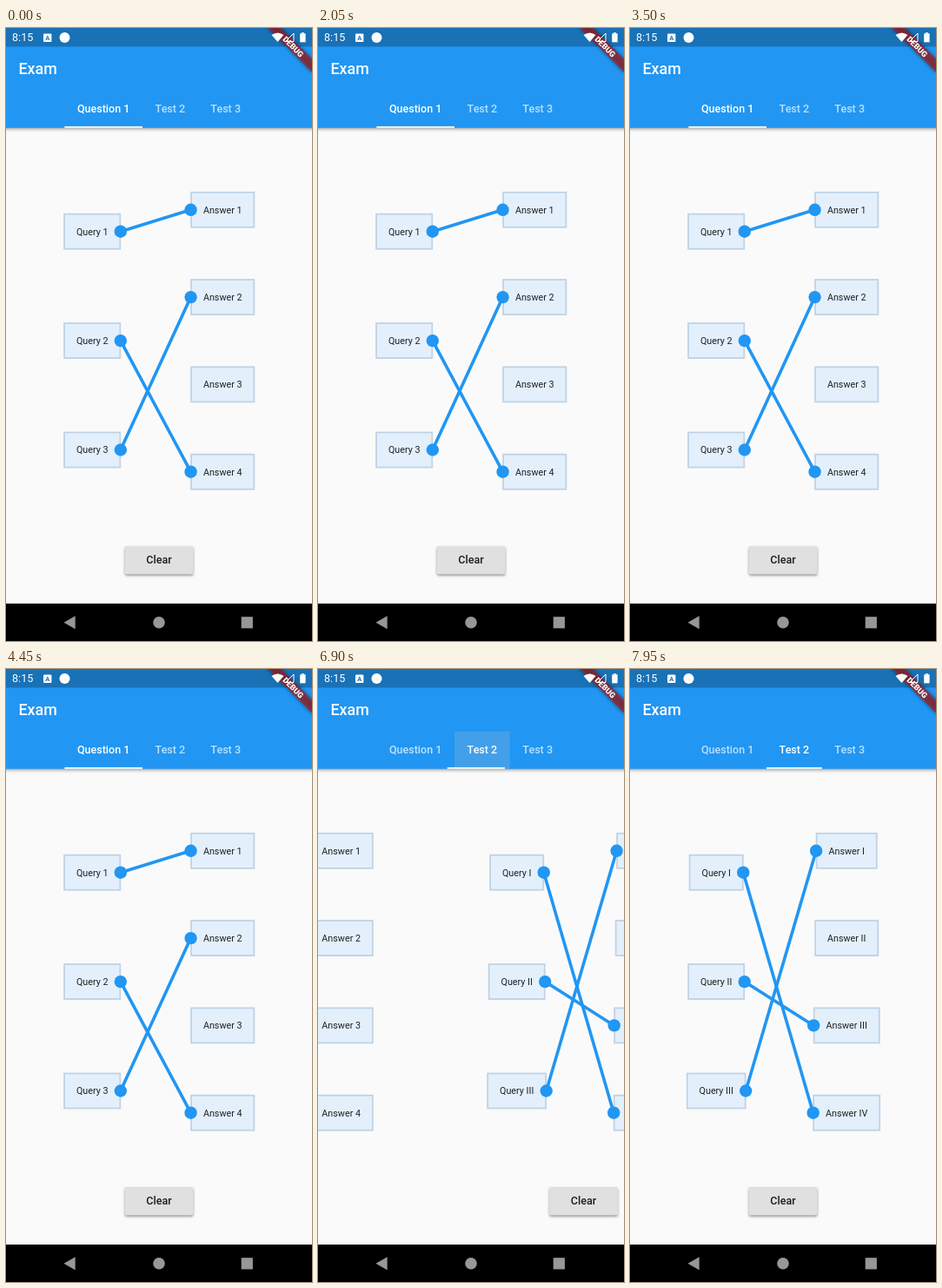
An HTML page with a canvas that plays this animation: 352x704 px, repeating every 8 s.

```html
<!DOCTYPE html>
<html lang="en">
<head>
<meta charset="utf-8">
<title>Exam</title>
<style>
html, body { margin: 0; width: 100%; height: 100%; overflow: hidden; background: #fafafa; }
canvas { display: block; width: 352px; height: 704px; }
</style>
</head>
<body>
<canvas id="stage" width="352" height="704"></canvas>
<script>
const ctx = document.getElementById('stage').getContext('2d');
const W = 352, LOOP = 8000, DP = 0.896;
const BLUE = '#2196f3', INK = 'rgba(0,0,0,.87)';
const QUERY_X = 99.2, ANSWER_X = 249.2, BOX_H = 41;

const pages = [
  { queries: ['1', '2', '3'], answers: ['1', '2', '3', '4'], links: [[0, 0], [1, 3], [2, 1]] },
  { queries: ['I', 'II', 'III'], answers: ['I', 'II', 'III', 'IV'], links: [[0, 3], [1, 2], [2, 0]] }
];
const tabs = [
  { label: 'Question 1', x: 67.3, w: 89.7 },
  { label: 'Test 2', x: 157, w: 63.8 },
  { label: 'Test 3', x: 220.8, w: 63.8 }
];
// finger paths: time, x, y
const drags = [
  [[2500, 131.6, 235], [2550, 131.4, 247], [2800, 133, 325], [2950, 134, 352], [3100, 134, 357]],
  [[5050, 133, 235], [5250, 160, 251], [5550, 222, 294], [5800, 234, 302], [5950, 235, 303]]
];

const clamp = v => Math.max(0, Math.min(1, v));
const lerp = (a, b, k) => a + (b - a) * k;
const ramp = (t, from, to) => clamp((t - from) / (to - from));

// cubic-bezier(.25, .1, .25, 1)
function ease(x) {
  let lo = 0, hi = 1, s = x;
  for (let i = 0; i < 24; i++) {
    s = (lo + hi) / 2;
    if (0.75 * s * (1 - s) + s * s * s < x) lo = s; else hi = s;
  }
  return 0.3 * s * (1 - s) ** 2 + 3 * s * s * (1 - s) + s ** 3;
}

function rect(x, y, w, h, color) {
  ctx.fillStyle = color;
  ctx.fillRect(x, y, w, h);
}

function disc(x, y, r, color) {
  ctx.fillStyle = color;
  ctx.beginPath();
  ctx.arc(x, y, r, 0, Math.PI * 2);
  ctx.fill();
}

function poly(points, color) {
  ctx.fillStyle = color;
  ctx.beginPath();
  points.forEach(p => ctx.lineTo(p[0], p[1]));
  ctx.fill();
}

function setFont(size, weight) {
  ctx.font = `${weight} ${size}px Roboto, sans-serif`;
}

function text(str, x, y, size, weight, color, align = 'center') {
  setFont(size, weight);
  ctx.textAlign = align;
  ctx.textBaseline = 'alphabetic';
  ctx.fillStyle = color;
  ctx.fillText(str, x, y + size * 0.355);
}

function shadow(color, blur, dy) {
  ctx.shadowColor = color;
  ctx.shadowBlur = blur;
  ctx.shadowOffsetY = dy;
}

function link(a, b) {
  ctx.strokeStyle = BLUE;
  ctx.lineWidth = 3.6;
  ctx.beginPath();
  ctx.moveTo(a.x, a.y);
  ctx.lineTo(b.x, b.y);
  ctx.stroke();
}

const queryY = i => 233.7 + 125.4 * i;
const answerY = i => 208.8 + 100.3 * i;

function box(label, cx, cy) {
  setFont(12 * DP, 400);
  const w = ctx.measureText(label).width + 32 * DP;
  const x = cx - w / 2, y = cy - BOX_H / 2;
  rect(x, y, w, BOX_H, '#e3f0fc');
  ctx.strokeStyle = '#bfd3e6';
  ctx.lineWidth = 1.8;
  ctx.strokeRect(x + 0.5, y + 0.5, w - 1, BOX_H - 1);
  text(label, cx, cy, 12 * DP, 400, INK);
  return w / 2;
}

function clearButton() {
  ctx.save();
  shadow('rgba(0,0,0,.38)', 3, 1.6);
  ctx.fillStyle = '#e0e0e0';
  ctx.beginPath();
  ctx.roundRect(136.7, 595, 78.8, 32.3, 1.8);
  ctx.fill();
  ctx.restore();
  text('Clear', 176, 611, 14 * DP, 500, INK);
}

function fingerAt(path, t) {
  for (let i = 1; i < path.length; i++) {
    const a = path[i - 1], b = path[i];
    if (t >= a[0] && t < b[0]) {
      const k = ramp(t, a[0], b[0]);
      return { x: lerp(a[1], b[1], k), y: lerp(a[2], b[2], k) };
    }
  }
  return null;
}

function drawPage(page, offset, t) {
  ctx.save();
  ctx.translate(offset, 0);
  const from = page.queries.map((n, i) =>
    ({ x: QUERY_X + box('Query ' + n, QUERY_X, queryY(i)), y: queryY(i) }));
  const to = page.answers.map((n, i) =>
    ({ x: ANSWER_X - box('Answer ' + n, ANSWER_X, answerY(i)), y: answerY(i) }));
  clearButton();

  if (page === pages[0]) {
    for (const path of drags) {
      const tip = fingerAt(path, t);
      if (!tip) continue;
      ctx.globalAlpha = 0.28;
      link(from[0], tip);
      disc(tip.x, tip.y, 7.2, BLUE);
      ctx.globalAlpha = 1;
    }
  }
  for (const [q, a] of page.links) {
    link(from[q], to[a]);
    disc(from[q].x, from[q].y, 7.2, BLUE);
    disc(to[a].x, to[a].y, 7.2, BLUE);
  }
  ctx.restore();
}

function tapGlow(t) {
  const tab = tabs[1];
  const level = ramp(t, 6600, 6740) * (1 - ramp(t, 6820, 7080));
  if (level <= 0) return;
  ctx.save();
  ctx.beginPath();
  ctx.rect(tab.x, 71.7, tab.w, 43);
  ctx.clip();
  rect(tab.x, 71.7, tab.w, 43, `rgba(188,188,188,${0.2 * level})`);
  disc(tab.x + tab.w / 2, 93, lerp(8, 42, ramp(t, 6600, 6850)), `rgba(200,200,200,${0.13 * level})`);
  ctx.restore();
}

function appBar(t) {
  ctx.save();
  shadow('rgba(0,0,0,.4)', 4, 1.6);
  rect(-10, 0, W + 20, 114.7, BLUE);
  ctx.restore();
  rect(0, 0, W, 21.4, '#1971b6');
  text('Exam', 14.4, 47, 20 * DP, 500, '#fff', 'left');

  tapGlow(t);
  const k = ease(ramp(t, 6710, 7010));
  const lit = [1 - k, k, 0];
  tabs.forEach((tab, i) =>
    text(tab.label, tab.x + tab.w / 2, 92.5, 14 * DP, 500, `rgba(255,255,255,${0.7 + 0.3 * lit[i]})`));
  rect(lerp(tabs[0].x, tabs[1].x, k), 112.9, lerp(tabs[0].w, tabs[1].w, k), 1.8, '#fff');
}

function banner() {
  ctx.save();
  ctx.translate(W, 0);
  ctx.rotate(Math.PI / 4);
  const bar = [-40 * DP, 28 * DP, 80 * DP, 12 * DP];
  ctx.filter = 'blur(2px)';
  rect(...bar, 'rgba(0,0,0,.5)');
  ctx.filter = 'none';
  rect(...bar, 'rgba(183,28,28,.627)');
  text('DEBUG', 0, 34 * DP, 10.2 * DP, 900, '#fff');
  ctx.restore();
}

function statusIcons() {
  text('8:15', 7, 11, 12.6, 400, '#fff', 'left');
  ctx.fillStyle = '#fff';
  ctx.beginPath();
  ctx.roundRect(43, 6.5, 9.4, 9.4, 1);
  ctx.fill();
  text('A', 47.7, 11.2, 7.5, 700, '#1971b6');
  disc(67.5, 11, 6, '#fff');

  ctx.fillStyle = '#fff';
  ctx.beginPath();
  ctx.moveTo(312.5, 16);
  ctx.lineTo(305.5, 8);
  ctx.quadraticCurveTo(312.5, 3, 319.5, 8);
  ctx.fill();

  ctx.strokeStyle = '#fff';
  ctx.lineWidth = 1;
  ctx.beginPath();
  ctx.moveTo(321.5, 15.5);
  ctx.lineTo(331, 15.5);
  ctx.lineTo(331, 6);
  ctx.closePath();
  ctx.stroke();

  rect(338.2, 6.3, 6.4, 10, '#fff');
  rect(339.9, 5.2, 3, 1.2, '#fff');
}

function navBar() {
  const gray = '#979797';
  rect(0, 661, W, 43, '#000');
  poly([[66.5, 682.8], [79.7, 675.3], [79.7, 690.2]], gray);
  disc(176, 682.7, 6.8, gray);
  rect(270.7, 676.2, 13.2, 13.2, gray);
}

function draw(t) {
  rect(0, 0, W, 704, '#fafafa');
  const slide = ease(ramp(t, 6791, 7091)) * W;
  if (slide < W) drawPage(pages[0], -slide, t);
  if (slide > 0) drawPage(pages[1], W - slide, t);
  appBar(t);
  banner();
  statusIcons();
  navBar();
}

const start = performance.now();
function tick() {
  draw((performance.now() - start) % LOOP);
  requestAnimationFrame(tick);
}
tick();
</script>
</body>
</html>
```
